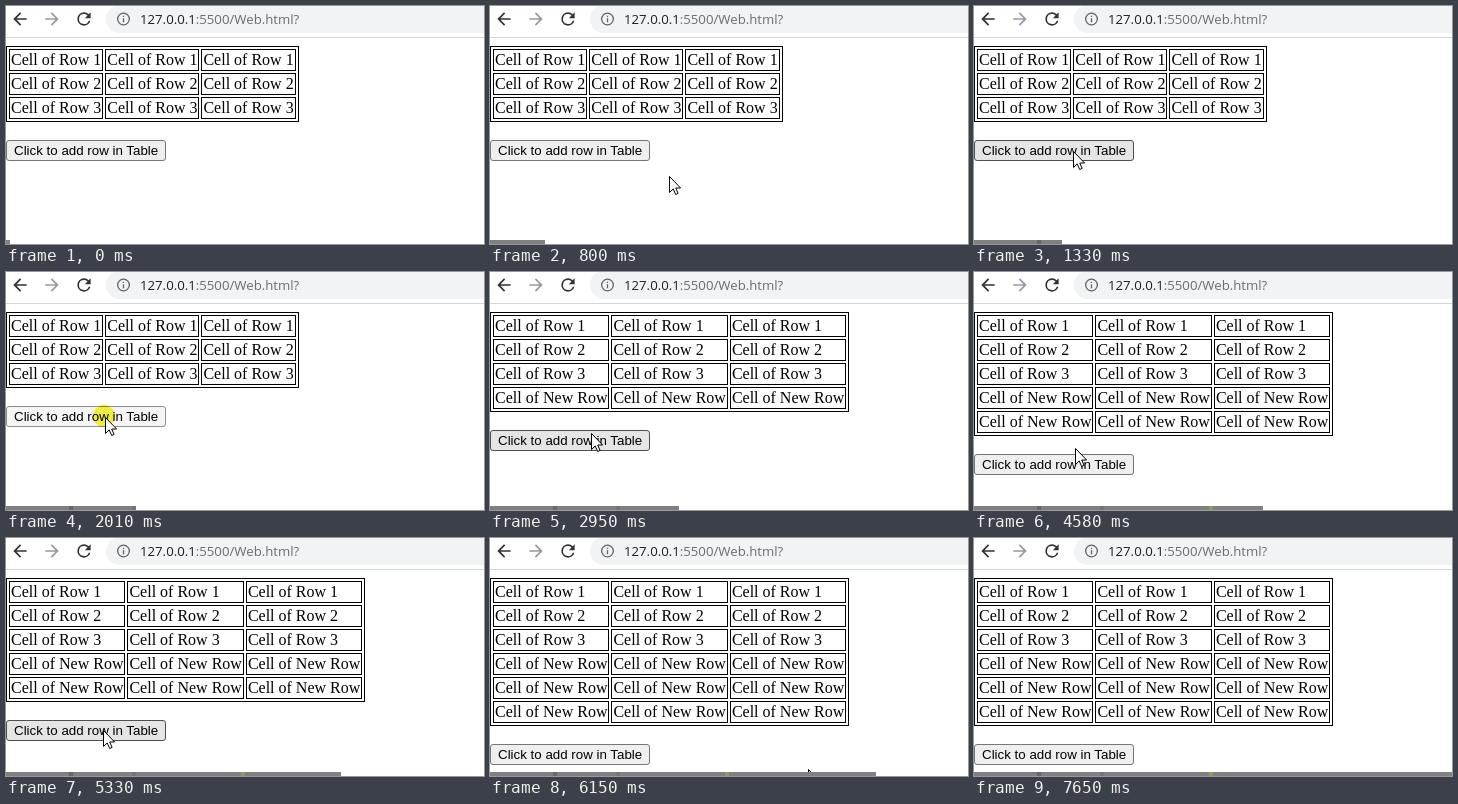
Animation, 478 px wide and 238 px high, one loop 7.72 s. Source, as an HTML page with a canvas:

```html
<!DOCTYPE html>
<html lang="en">
<head>
<meta charset="utf-8">
<title>Add table rows</title>
<style>
  html, body { margin: 0; width: 100%; height: 100%; overflow: hidden; background: #fff; }
  #stage { position: relative; width: 478px; height: 238px; overflow: hidden; background: #fff; color: #000; }
  #stage > * { position: absolute; }
  #rule { left: 0; top: 31px; width: 478px; height: 1px; background: #d3d5d8; }
  #pill { left: 100px; top: -1px; width: 420px; height: 28px; border-radius: 14px; background: #f1f3f4; }
  #url { left: 134px; top: 3px; font: 13.2px/20px "Open Sans", "Noto Sans", sans-serif; color: #6a6d71; white-space: nowrap; }
  #url b { font-weight: 400; color: #202124; }
  table { left: 0; top: 40px; border: 1px solid #000; border-spacing: 2px; border-collapse: separate;
    font: 16px/18px "Liberation Serif", "Times New Roman", serif; }
  td { border: 1px solid #000; padding: 1px; height: 18px; white-space: nowrap; }
  #btn { left: 0; box-sizing: border-box; height: 21px; padding: 2px 7px; border: 1px solid #767676;
    border-radius: 3px; background: #efefef; white-space: nowrap;
    font: 13.333px/15px "Liberation Sans", Arial, sans-serif; }
  #btn.hover { background: #e5e5e5; border-color: #4f4f4f; }
  #btn.down { background: #f5f5f5; border-color: #8d8d8d; }
  #spot { width: 22px; height: 22px; border-radius: 50%; background: #f8f545; mix-blend-mode: multiply; }
  canvas { left: 0; top: 0; }
</style>
</head>
<body>
<div id="stage">
  <div id="rule"></div>
  <div id="pill"></div>
  <div id="url"><b>127.0.0.1</b>:5500/Web.html?</div>
  <table><tbody id="rows"></tbody></table>
  <div id="btn">Click to add row in Table</div>
  <div id="spot"></div>
  <canvas id="art" width="478" height="238"></canvas>
</div>
<script>
const LOOP = 7720, FRAMES = 114, STEP = LOOP / FRAMES;
const W = 478, H = 238;
const $ = id => document.getElementById(id);
const ctx = $('art').getContext('2d');
const btn = $('btn'), spot = $('spot');

// pointer stops: time, x, y
const path = [
  [0, 181, 262], [350, 181, 240], [800, 179, 170], [1220, 99, 145], [2100, 99, 145],
  [2400, 99, 142], [2880, 101, 161], [3240, 101, 162], [3600, 101, 172], [4200, 101, 172],
  [4800, 101, 177], [5240, 97, 192], [5780, 97, 192], [6150, 318, 231],
  [6500, 374, 232], [6560, 376, 244], [LOOP, 376, 262]
];
const presses = [[1850, 2050], [3720, 3990], [5540, 5760]];

const icons = {
  back: new Path2D('M20 11H7.83l5.59-5.59L12 4l-8 8 8 8 1.41-1.41L7.83 13H20z'),
  forward: new Path2D('M12 4l-1.41 1.41L16.17 11H4v2h12.17l-5.58 5.59L12 20l8-8z'),
  reload: new Path2D('M17.65 6.35A7.96 7.96 0 0 0 12 4a8 8 0 1 0 7.73 10h-2.08A6 6 0 1 1 12 6c1.66 0 3.14.69 4.22 1.78L13 11h7V4z'),
  info: new Path2D('M11 17h2v-6h-2zM12 2a10 10 0 1 0 0 20 10 10 0 0 0 0-20zM12 4a8 8 0 1 1 0 16 8 8 0 0 1 0-16zM11 9h2V7h-2z')
};
const arrow = new Path2D('M.5 .5V16.5L4.2 12.9 6.7 18.5 9.1 17.4 6.7 12H11.6z');

const labels = ['Row 1', 'Row 2', 'Row 3', 'New Row', 'New Row', 'New Row'];
const rows = labels.map(label => {
  const tr = $('rows').insertRow();
  for (let c = 0; c < 3; c++) tr.insertCell().textContent = 'Cell of ' + label;
  return tr;
});

function pointer(t) {
  const k = Math.max(1, path.findIndex(p => p[0] > t));
  const [t0, x0, y0] = path[k - 1], [t1, x1, y1] = path[k];
  const u = (t - t0) / (t1 - t0), e = u * u * (3 - 2 * u);
  return [Math.round(x0 + (x1 - x0) * e), Math.round(y0 + (y1 - y0) * e)];
}

function icon(shape, x, y, size, color) {
  ctx.save();
  ctx.translate(x - 12 * size, y - 12 * size);
  ctx.scale(size, size);
  ctx.fillStyle = color;
  ctx.fill(shape, 'evenodd');
  ctx.restore();
}

function drawPointer(x, y) {
  ctx.save();
  ctx.translate(x, y);
  ctx.fillStyle = '#fff';
  ctx.strokeStyle = '#000';
  ctx.lineWidth = 1;
  ctx.fill(arrow);
  ctx.stroke(arrow);
  ctx.restore();
}

function drawBar(width) {
  ctx.save();
  ctx.beginPath();
  ctx.rect(0, 234, width, 4);
  ctx.clip();
  const block = (x, w, color) => { ctx.fillStyle = color; ctx.fillRect(x, 234, w, 4); };
  block(0, W, '#808080');
  block(63, 4, '#686868');
  block(126, 4, '#757575');
  block(235, 4, '#8d9a6a');
  ctx.restore();
}

function draw(now) {
  const frame = Math.min(FRAMES - 1, Math.floor((now % LOOP + 32) / STEP));
  const t = frame * STEP;
  const [x, y] = pointer(t);
  const added = presses.filter(p => t >= p[1]).length;
  const down = presses.some(p => t >= p[0] && t < p[1]);
  const top = 134 + 24 * added;
  const over = x < 160 && y >= top && y < top + 21;

  rows.forEach((tr, i) => { tr.style.display = i < 3 + added ? '' : 'none'; });
  btn.style.top = top + 'px';
  btn.className = down ? 'down' : over ? 'hover' : '';
  spot.style.display = down ? '' : 'none';
  spot.style.left = x - 12 + 'px';
  spot.style.top = y - 12 + 'px';

  ctx.clearRect(0, 0, W, H);
  icon(icons.back, 14, 13, 0.83, '#303236');
  icon(icons.forward, 46, 13, 0.83, '#96999d');
  icon(icons.reload, 78, 13, 0.83, '#303236');
  icon(icons.info, 117.5, 13, 0.65, '#5f6368');
  drawPointer(x, y);
  drawBar(Math.round(W * (frame + 1) / FRAMES));
}

const start = performance.now();
function tick() {
  draw(performance.now() - start);
  requestAnimationFrame(tick);
}
tick();
</script>
</body>
</html>
```
